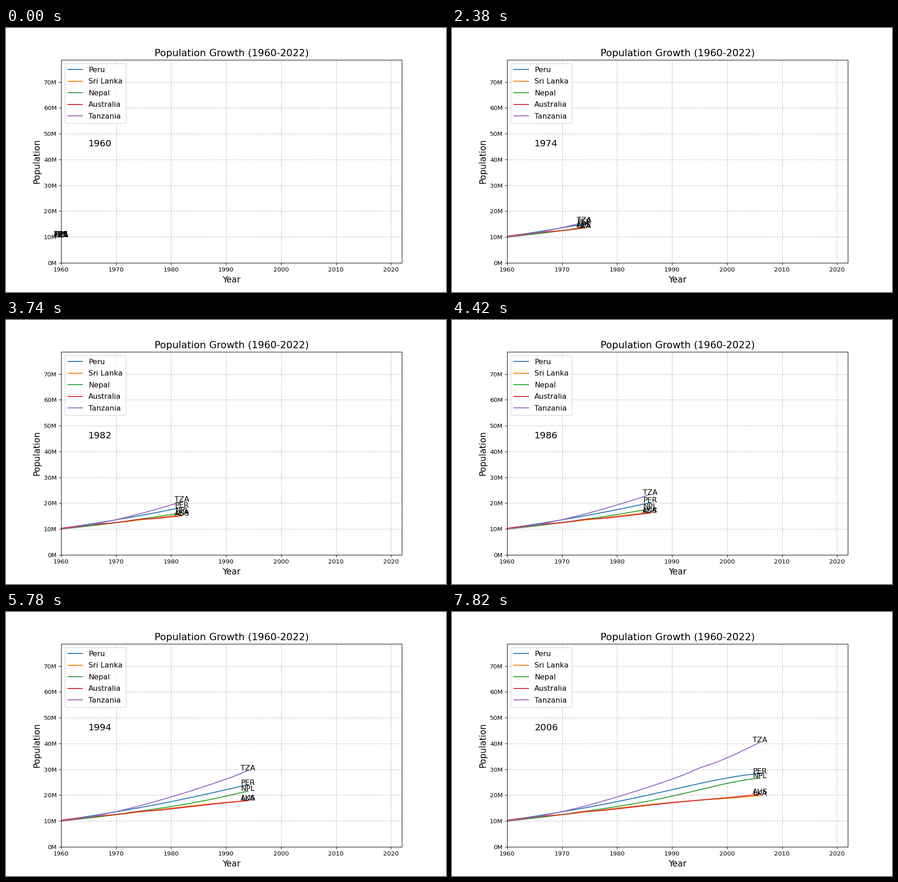
A matplotlib script for the animation above (7990 ms loop, 966x580 px).

```python
import numpy as np
import matplotlib.pyplot as plt
from matplotlib.animation import FuncAnimation

DPI = 96.6
START, LAST, END = 1960, 2006, 2022

plt.rcParams["font.family"] = "DejaVu Sans"

# Millions of people at the start of each decade, 1960 to 2010
COUNTRIES = [
    ("Peru", "PER", [10.155, 13.56, 17.49, 22.11, 26.65, 28.5]),
    ("Sri Lanka", "LKA", [9.874, 12.42, 14.95, 17.2, 18.78, 21.09]),
    ("Nepal", "NPL", [10.105, 12.5, 15.6, 19.62, 24.56, 26.38]),
    ("Australia", "AUS", [10.276, 12.507, 14.692, 17.065, 19.029, 22.06]),
    ("Tanzania", "TZA", [10.052, 13.62, 19.3, 26.21, 34.46, 45.4]),
]
# Short waves of immigration: middle year and height
SURGES = {"AUS": (1974, 0.38), "TZA": (1995, 0.4)}


def population(code, values, x):
    """Smooth polynomial through the decade values, plus any surge."""
    decade = (x - START) / 10
    curve = np.polyval(np.polyfit(range(len(values)), values,
                                  len(values) - 1), decade)
    mid, height = SURGES.get(code, (START, 0))
    return curve + height * np.exp(-((x - mid) / 2) ** 2)


years = np.arange(START, LAST + 1)
curves = [population(code, values, years) for _, code, values in COUNTRIES]

fig, ax = plt.subplots(figsize=(966.001 / DPI, 580.001 / DPI), dpi=DPI)
fig.subplots_adjust(bottom=0.1105, top=0.88)
ax.set_xlim(START, END)
ax.set_ylim(0, 78.66)
ax.set_title("Population Growth (1960-2022)", fontsize=16)
ax.set_xlabel("Year", fontsize=14)
ax.set_ylabel("Population", fontsize=14)
ax.yaxis.set_major_formatter(lambda v, pos: f"{v:.0f}M")
ax.grid(True, linestyle="--", alpha=0.8)

lines = [ax.plot([], [], label=name)[0] for name, _, _ in COUNTRIES]
tags = [ax.text(START, 0, code, fontsize=12, ha="center")
        for _, code, _ in COUNTRIES]
year_text = ax.text(1965, 45.1, "", fontsize=15)
ax.legend(loc="upper left", fontsize=12, labelspacing=0.65, borderpad=0.45)


def update(k):
    for line, tag, curve in zip(lines, tags, curves):
        line.set_data(years[:k + 1], curve[:k + 1])
        tag.set_position((years[k], curve[k]))
    year_text.set_text(str(years[k]))
    return [*lines, *tags, year_text]


anim = FuncAnimation(fig, update, frames=len(years), interval=170,
                     repeat=True, repeat_delay=0)
plt.show()
```
